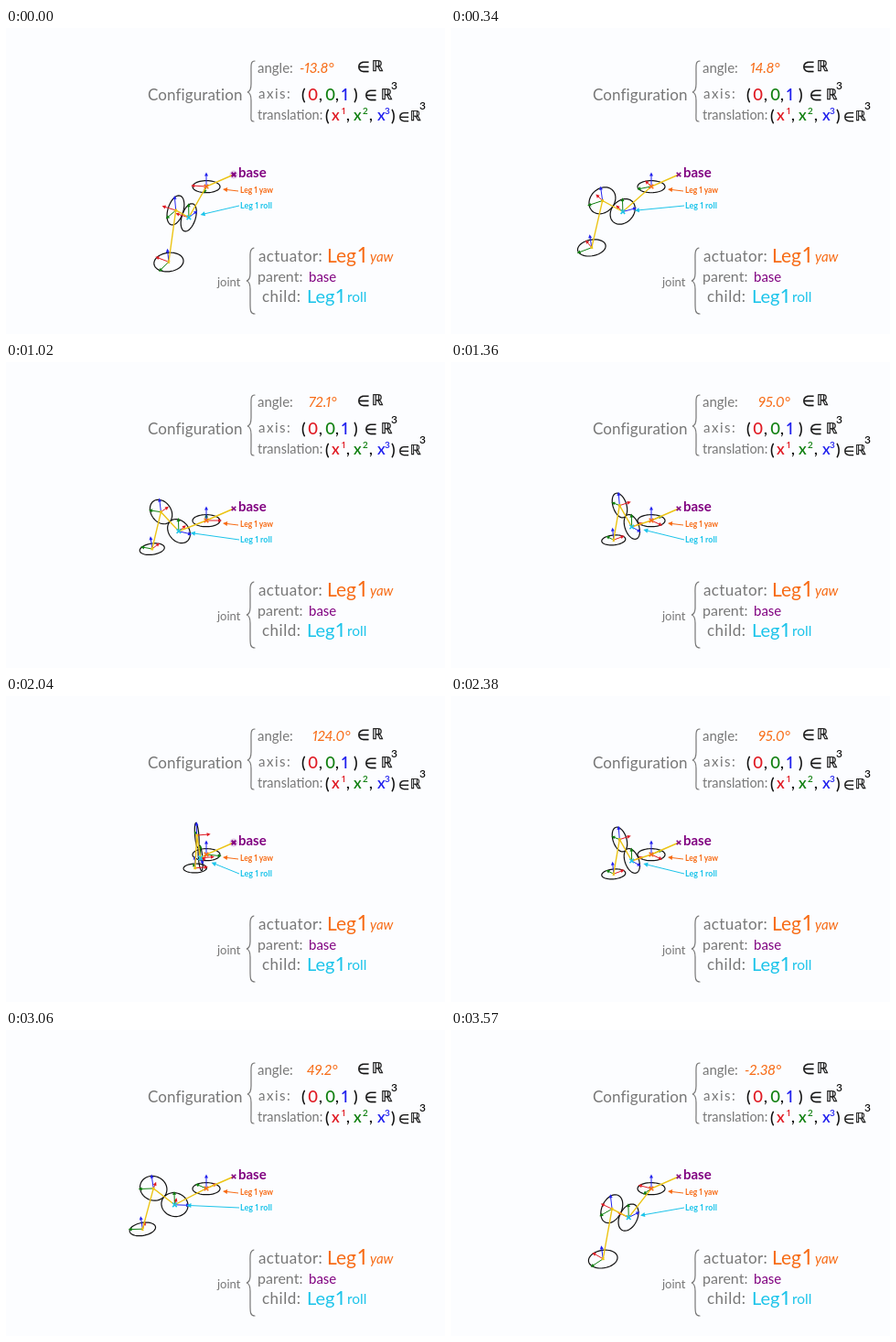
Write an HTML page that moves like this. It is 480 by 334 pixels and loops after 3740 ms.

```html
<!DOCTYPE html>
<html lang="en">
<head>
<meta charset="utf-8">
<title>Joint configuration</title>
<style>
  html, body { margin: 0; width: 100%; height: 100%; overflow: hidden; background: #fcfdff; }
  svg { display: block; width: 480px; height: 334px; }
  text { font-family: Lato, "Open Sans", sans-serif; font-variant-numeric: proportional-nums; white-space: pre; }
  .math text { font-family: "DejaVu Sans", sans-serif; fill: #111; stroke: #111; stroke-width: .3; }
  .strong text { font-weight: 600; }
  .gray { fill: #777; }
  .black { fill: #111; }
  .red { fill: #e01b24; }
  .green { fill: #118011; }
  .blue { fill: #2222ee; }
  .orange { fill: #f76b15; }
  .purple { fill: #800080; }
  .cyan { fill: #1cc4ea; }
  .brace { fill: none; stroke: #777; stroke-width: 1.2; stroke-linecap: round; }
  .tag { font-weight: 700; }
  .slanted { font-style: italic; }
</style>
</head>
<body>
<svg viewBox="0 0 480 334">
  <g class="gray">
    <text x="155" y="79" font-size="17" letter-spacing=".1">Configuration</text>
    <text x="275" y="49" font-size="15">angle:</text>
    <text x="276" y="77" font-size="15" letter-spacing="1.5">axis:</text>
    <text x="275" y="100" font-size="14.5">translation:</text>
    <text x="231" y="282" font-size="13">joint</text>
    <text x="276" y="255" font-size="17" letter-spacing=".4">actuator:</text>
    <text x="275" y="277" font-size="16">parent:</text>
    <text x="280" y="299" font-size="17" letter-spacing=".5">child:</text>
  </g>
  <path class="brace" d="M272 36C267 36 268 42 268 48V61Q268 69 264 70Q268 71 268 79V92C268 99 267 102 271 102"/>
  <path class="brace" d="M271 240C266 241 267 248 267 254V268Q267 275 263 276Q267 277 267 285V300C267 308 267 312 272 312"/>

  <g class="math" font-size="16">
    <text x="384" y="48">∈</text><text x="400" y="47">ℝ</text>
    <text x="392" y="79">∈</text><text x="410" y="78">ℝ</text>
    <text x="429" y="102" font-size="14">∈</text><text x="442" y="101" font-size="15">ℝ</text>
  </g>
  <g class="strong" font-size="17">
    <text class="black" x="323" y="79">(</text>
    <text class="red" x="330" y="79">0</text><text class="black" x="342" y="79">,</text>
    <text class="green" x="349" y="79">0</text><text class="black" x="360" y="79">,</text>
    <text class="blue" x="367" y="79">1</text><text class="black" x="380" y="79">)</text>
    <text class="black" x="349" y="102">(</text>
    <text class="red" x="356" y="101">x</text><text class="black" x="372" y="101">,</text>
    <text class="green" x="380" y="101">x</text><text class="black" x="397" y="101">,</text>
    <text class="blue" x="406" y="101">x</text><text class="black" x="421" y="102">)</text>
  </g>
  <g class="strong" font-size="10">
    <text class="red" x="367" y="94">1</text>
    <text class="green" x="390" y="94">2</text>
    <text class="blue" x="414" y="94">3</text>
    <text class="black" x="421" y="67" font-size="12">3</text>
    <text class="black" x="452" y="89" font-size="12">3</text>
  </g>

  <g class="orange">
    <text x="351" y="256" font-size="21">Leg</text>
    <text x="385" y="256" font-size="23">1</text>
    <text class="slanted" x="398" y="255" font-size="15">yaw</text>
  </g>
  <text class="purple" x="331" y="277" font-size="15">base</text>
  <g class="cyan">
    <text x="329" y="300" font-size="20">Leg</text>
    <text x="361" y="300" font-size="22">1</text>
    <text x="373" y="299" font-size="15.5">roll</text>
  </g>

  <text class="purple" x="254" y="163" font-size="15" font-weight="700">base</text>
  <text class="tag orange" x="256" y="180" font-size="8.5">Leg 1 yaw</text>
  <text class="tag cyan" x="256" y="197" font-size="9">Leg 1 roll</text>
  <text id="angle" class="orange slanted" y="49" font-size="15.5"></text>
  <g id="robot" fill="none"></g>
</svg>
<script>
const STEP_MS = 170;
// yaw angle in degrees, and left edge of its label
const POSES = [
  [-13.8, 321], [-2.38, 321], [14.8, 327], [32, 327], [49.2, 329], [60.7, 334],
  [72.1, 331], [83.6, 337], [95, 336], [112.2, 334], [123.7, 335], [135.1, 339]
];
const LAST = POSES.length - 1;
const RED = '#e01b24', GREEN = '#118011', BLUE = '#2222ee';
const ORANGE = '#f76b15', CYAN = '#1cc4ea', GOLD = '#ecc414', PURPLE = '#800080';
const ORIGIN = [219, 173], BASE = [249, 160];
const TILT_SIN = 0.436, TILT_COS = 0.9, VIEW = 489;
const RADIUS = 15, AXIS = 17, LEAN = 0.08;

const rad = deg => deg * Math.PI / 180;
const add = (a, b, k = 1) => a.map((v, i) => v + b[i] * k);
const neg = a => a.map(v => -v);
const mix = (a, ka, b, kb) => a.map((v, i) => v * ka + b[i] * kb);
const fmt = p => p.map(v => v.toFixed(2)).join(' ');

// vectors are [right, towards viewer, down]
const heading = deg => [-Math.cos(rad(deg)), -Math.sin(rad(deg)), 0];
const UP = [0, 0, -1];

function project([x, near, down]) {
  const depth = near * TILT_COS - down * TILT_SIN;
  const s = VIEW / (VIEW - depth);
  return [ORIGIN[0] + x * s, ORIGIN[1] + (near * TILT_SIN + down * TILT_COS) * s];
}

const path = (d, color, width = 1.2) => `<path d="${d}" stroke="${color}" stroke-width="${width}"/>`;
const line = (pts, color, width) => path('M' + pts.map(fmt).join('L'), color, width);

function arrow(a, b, color, head = 4) {
  const dx = b[0] - a[0], dy = b[1] - a[1], len = Math.hypot(dx, dy) || 1;
  const size = Math.min(head, len * 0.6);
  const ux = dx / len * size, uy = dy / len * size;
  const left = [b[0] - ux - uy * 0.5, b[1] - uy + ux * 0.5];
  const right = [b[0] - ux + uy * 0.5, b[1] - uy - ux * 0.5];
  return line([a, [b[0] - ux / 2, b[1] - uy / 2]], color, 1) +
    `<path d="M${[b, left, right].map(fmt).join('L')}Z" fill="${color}"/>`;
}

function cross([x, y], r, color, width) {
  return path(`M${x - r} ${y - r}L${x + r} ${y + r}M${x + r} ${y - r}L${x - r} ${y + r}`, color, width);
}

function ring(center, u, v) {
  const pts = Array.from({ length: 48 }, (_, i) => {
    const t = i / 24 * Math.PI;
    return fmt(project(add(center, mix(u, Math.cos(t), v, Math.sin(t)), RADIUS)));
  });
  return path('M' + pts.join('L') + 'Z', '#111');
}

function axes(center, dirs) {
  const from = project(center);
  return dirs.map((dir, i) =>
    arrow(from, project(add(center, dir, AXIS)), [RED, GREEN, BLUE][i])).join('');
}

function drawRobot(theta, glow) {
  const out = heading(theta - 45), side = heading(theta + 45);
  const outLean = mix(out, Math.cos(LEAN), UP, -Math.sin(LEAN));
  const upLean = mix(UP, Math.cos(LEAN), out, Math.sin(LEAN));
  const at = (reach, down) => mix(out, reach, UP, -down);

  const yaw = [0, 0, 0], roll = at(35.5, 21.5), knee = at(58.5, 2), foot = at(73.9, 54.6);
  const rollPos = project(roll);
  const label = [255, 194];
  const dx = label[0] - rollPos[0], dy = label[1] - rollPos[1], gap = 13 / Math.hypot(dx, dy);

  return (glow ? `<circle cx="${BASE[0]}" cy="${BASE[1]}" r="4.5" fill="${PURPLE}" opacity=".2"/>` : '') +
    ring(yaw, out, side) + ring(roll, out, UP) + ring(knee, out, UP) + ring(foot, outLean, side) +
    axes(yaw, [heading(36 + 2 * theta), heading(2 * theta - 54), UP]) +
    axes(roll, [side, UP, neg(out)]) +
    axes(knee, [side, outLean, upLean]) +
    axes(foot, [side, outLean, upLean]) +
    line([BASE, ...[yaw, roll, knee, foot].map(project)], GOLD, 1.4) +
    [knee, foot].map(p => cross(project(p), 1.2, GOLD, 1.4)).join('') +
    cross(ORIGIN, 2.3, ORANGE, 1.6) + cross(rollPos, 2.3, CYAN, 1.6) +
    cross(BASE, 2.3, PURPLE, glow ? 2 : 1.6) +
    arrow([254, 178], [237, 176], ORANGE, 5) +
    arrow(label, [rollPos[0] + dx * gap, rollPos[1] + dy * gap], CYAN, 5);
}

function angleText(deg) {
  const rounded = Number(deg.toPrecision(3));
  return (Number.isInteger(rounded) ? rounded.toFixed(1) : String(rounded)) + '°';
}

const angle = document.getElementById('angle');
const robot = document.getElementById('robot');
let shown = -1;

function tick() {
  const step = Math.floor(performance.now() / STEP_MS) % (2 * LAST);
  const pose = Math.min(step, 2 * LAST - step);
  if (pose !== shown) {
    shown = pose;
    const [theta, x] = POSES[pose];
    angle.setAttribute('x', x);
    angle.textContent = angleText(theta);
    robot.innerHTML = drawRobot(theta, pose === 0 || pose >= 10);
  }
  requestAnimationFrame(tick);
}
tick();
</script>
</body>
</html>
```
